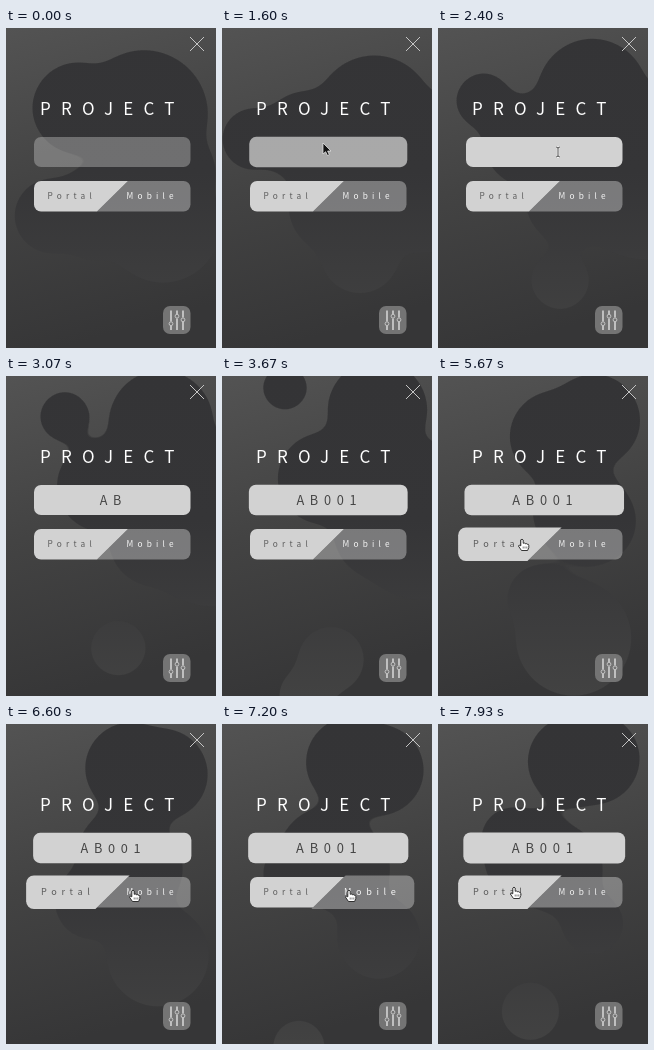
An HTML page for the animation above (8000 ms loop, 210 by 320 pixels).

```html
<!DOCTYPE html>
<html lang="en">
<head>
<meta charset="utf-8">
<title>Project login</title>
<style>
  html, body { margin: 0; width: 100%; height: 100%; overflow: hidden; background: #3c3c3c; }
  svg { display: block; width: 100%; height: 100%; }
  text { font-family: "Noto Sans CJK JP", "Noto Sans CJK SC", "Noto Sans", sans-serif; }
  .title { font-size: 17px; letter-spacing: 10.2px; fill: #fff; }
  .code { font-size: 12.6px; font-weight: 300; letter-spacing: 5.6px; fill: #444; text-anchor: middle; }
  .label { font-size: 8.3px; letter-spacing: 4.2px; }
  .line { fill: none; stroke: #c4c4c4; }
</style>
</head>
<body>
<svg viewBox="0 0 210 320" preserveAspectRatio="none">
  <defs>
    <linearGradient id="wall" gradientUnits="userSpaceOnUse" x1="0" y1="0" x2="90" y2="310">
      <stop offset="0" stop-color="#535353"/>
      <stop offset=".5" stop-color="#434343"/>
      <stop offset="1" stop-color="#363637"/>
    </linearGradient>
    <linearGradient id="lava" gradientUnits="userSpaceOnUse" x1="0" y1="0" x2="0" y2="320">
      <stop offset="0" stop-color="#343436"/>
      <stop offset=".45" stop-color="#353537"/>
      <stop offset="1" stop-color="#424242"/>
    </linearGradient>
    <filter id="goo" filterUnits="userSpaceOnUse" x="-60" y="-60" width="330" height="440" color-interpolation-filters="sRGB">
      <feGaussianBlur stdDeviation="10"/>
      <feColorMatrix values="1 0 0 0 0  0 1 0 0 0  0 0 1 0 0  0 0 0 24 -11"/>
    </filter>
    <mask id="shape" maskUnits="userSpaceOnUse" x="0" y="0" width="210" height="320">
      <g id="balls" fill="#fff" filter="url(#goo)"></g>
    </mask>
    <path id="ibeam" d="M-2-5Q0-5 0-3.5Q0-5 2-5M0-3.5V3.5M-2 5Q0 5 0 3.5Q0 5 2 5"/>
  </defs>

  <rect width="210" height="320" fill="url(#wall)"/>
  <rect width="210" height="320" fill="url(#lava)" mask="url(#shape)"/>

  <path class="line" d="M184 9L198 23M198 9L184 23"/>
  <text class="title" x="34" y="87.3">PROJECT</text>

  <g id="field">
    <rect id="box" x="28" y="109" width="156.5" height="30" rx="7" fill="#d2d2d2"/>
    <text id="code" class="code" x="107.3" y="128.7"></text>
  </g>

  <g id="mobile">
    <path d="M122 153H177.5a7 7 0 0 1 7 7V176.5a7 7 0 0 1-7 7H91Z" fill="#d2d2d2" fill-opacity=".43"/>
    <text class="label" x="120.6" y="171" fill="#f4f4f4" font-weight="500">Mobile</text>
  </g>
  <g id="portal">
    <path d="M122 153H35a7 7 0 0 0-7 7V176.5a7 7 0 0 0 7 7H91Z" fill="#d2d2d2"/>
    <text class="label" x="41.6" y="171" fill="#5c5c5c">Portal</text>
  </g>

  <rect x="157" y="278" width="27.5" height="28" rx="7" fill="#747474"/>
  <path class="line" stroke-width="1.9" d="M165 282.5V293.5M165 298V302M171 282.5V286M171 290.5V302M177 282.5V289.5M177 294V302"/>
  <g class="line">
    <circle cx="165" cy="295.7" r="1.9"/>
    <circle cx="171" cy="288.2" r="1.9"/>
    <circle cx="177" cy="291.8" r="1.9"/>
  </g>

  <path id="arrow" d="M0 0V11L2.6 8.7L4.5 12.5L6.3 11.7L4.6 8H8Z" fill="#111" stroke="#eee" stroke-width=".7"/>
  <g id="beam" fill="none">
    <use href="#ibeam" stroke="#fff" stroke-width="2.2"/>
    <use href="#ibeam" stroke="#333" stroke-width=".9"/>
  </g>
  <g id="hand" stroke="#222">
    <path d="M-1.2 1Q0-.8 1.2 1V4.3Q2.4 3.4 3.2 4.7Q4.4 4 5.1 5.2Q6.8 4.8 6.8 6.5V8.5L5.6 11.5H-.5L-3.6 7Q-3.3 5.300-1.2 6.8Z"
      fill="#fff" stroke-width=".9" stroke-linejoin="round"/>
    <path d="M1.2 7.5V9.5M3 7.5V9.5M4.8 7.5V9.5" stroke-width=".6"/>
  </g>
</svg>
<script>
const LOOP = 8000;
const { sin, cos, exp, abs, max, min, floor } = Math;
const $ = id => document.getElementById(id);

// Eased step from 0 to 1 that begins at `start`.
function ramp(t, start, span = 200) {
  const u = max(0, min(1, (t - start) / span));
  return u * u * (3 - 2 * u);
}

// Small bubble that weaves upwards; it is largest at age 0.
const riser = (x, age) => [x - 17 * sin(1.3 * age), 188 - 48 * age, max(0, 38 - 4 * abs(age))];

// All lava balls as [x, y, radius], s in seconds.
function lava(s) {
  const calm = exp(-s * s / 9);
  const surge = sin(.6 * s);
  return [
    riser(46, s),
    riser(90, s - 6.4),
    riser(85, s - 10),
    // left shoulder
    [72 + 8 * s, 75 + 38 * cos(.6 * s - 1.44), 46],
    // head
    [156 - 18 * exp(-s), 36 + 50 * calm + 14 * sin(1.2 * s), 46 + 18 * calm],
    // core
    [127 - 35 * cos(.75 * s), 158 + 27 * cos(.45 * s), 48],
    // right flank
    [165 + 45 * surge, 145, 45 + 42 * max(0, surge)],
    // sinking foot
    [133 + 24 * cos(.85 * s), 242 - 45 * cos(.75 * s), 43 + 15 * cos(1.1 * s)]
  ];
}

const balls = lava(0).map(() =>
  $('balls').appendChild(document.createElementNS('http://www.w3.org/2000/svg', 'circle')));

function zoom(id, s, x, y) {
  $(id).setAttribute('transform', `translate(${x} ${y}) scale(${s}) translate(${-x} ${-y})`);
}

function pointerKind(t) {
  if (t < 1450 || (t >= 2700 && t < 3900)) return '';
  if (t < 1750) return 'arrow';
  if (t < 2700) return 'beam';
  return t < 4380 ? 'arrow' : 'hand';
}

function drawPointer(t) {
  const toField = ramp(t, 1700, 500);
  const toPortal = ramp(t, 3900, 700);
  const toMobile = ramp(t, 6100, 450);
  const back = ramp(t, 7350, 450);
  const x = 101 + 19 * toField - 36 * toPortal + 43 * toMobile - 51 * back;
  const y = 115 + 9 * toField + 64 * ramp(t, 2700) - 25 * toPortal + 3 * toMobile - 3 * back;
  const kind = pointerKind(t);
  for (const id of ['arrow', 'beam', 'hand']) {
    $(id).style.display = id === kind ? '' : 'none';
    $(id).setAttribute('transform', `translate(${x} ${y})`);
  }
}

function draw(t) {
  const s = t / 1000;
  lava(s).forEach((pose, i) => ['cx', 'cy', 'r'].forEach((name, k) =>
    balls[i].setAttribute(name, pose[k].toFixed(2))));

  const hover = ramp(t, 1450, 150);
  const focus = ramp(t, 1950, 250);
  const pulse = (.022 + .012 * sin(2 * (s - 4))) * ramp(t, 3200, 300);
  zoom('field', 1 + .01 * (hover - focus) + pulse, 106.25, 124);
  $('box').setAttribute('fill-opacity', .37 + .37 * hover + .26 * focus);
  $('code').textContent = 'AB001'.slice(0, max(0, floor((t - 2600) / 170)));

  const mobile = ramp(t, 6640) - ramp(t, 7400);
  const portal = ramp(t, 4400) - ramp(t, 6640) + ramp(t, 7480);
  zoom('mobile', 1 + .1 * mobile, 106.5, 168);
  zoom('portal', 1 + .1 * portal, 106.5, 168);
  drawPointer(t);
}

const begin = performance.now();
function tick() {
  draw((performance.now() - begin) % LOOP);
  requestAnimationFrame(tick);
}
tick();
</script>
</body>
</html>
```
